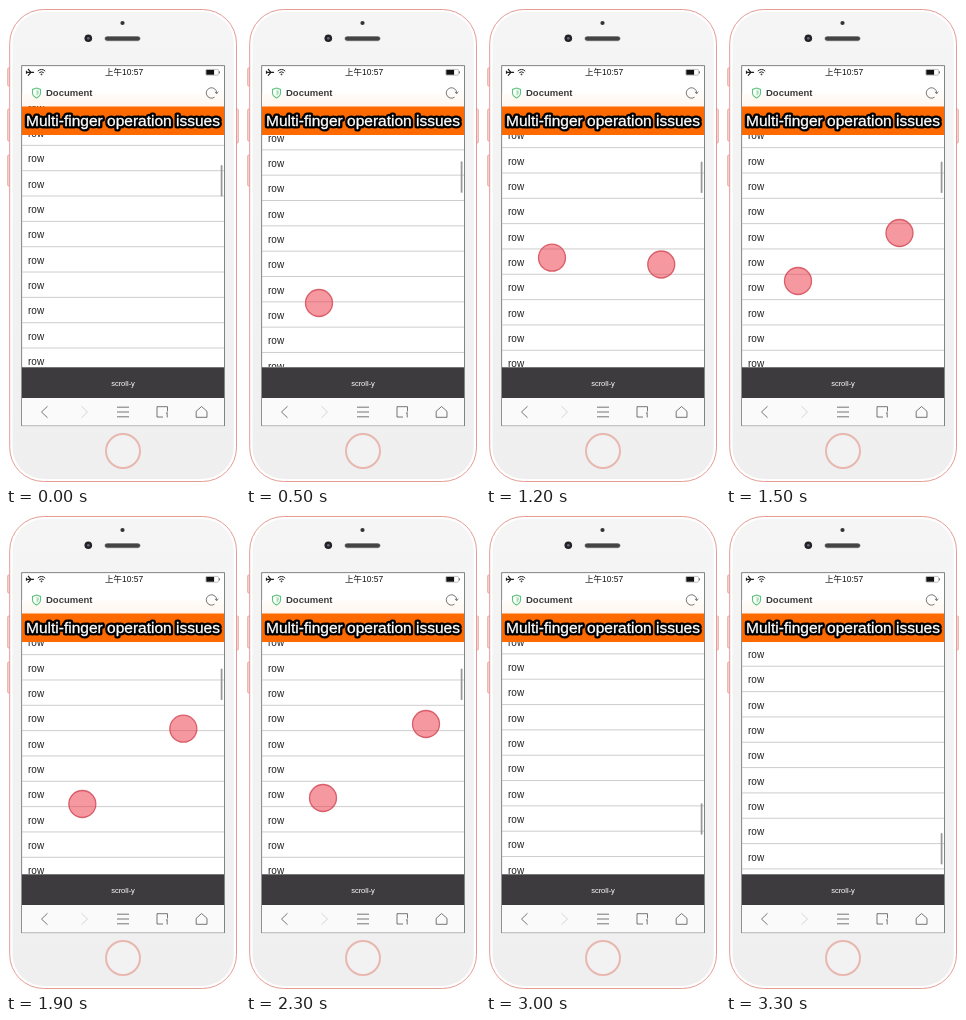
Recreate the animation shown at these times as an HTML page. Size 234 px wide and 479 px high, loop 3.4 s.

```html
<!DOCTYPE html>
<html lang="en">
<head>
<meta charset="utf-8">
<title>Multi-finger operation issues</title>
<style>
  html, body { margin: 0; width: 100%; height: 100%; overflow: hidden; background: #fff; }
  svg { display: block; width: 234px; height: 479px; }
  text { font-family: "Liberation Sans", Arial, sans-serif; }
  .cjk { font-family: "Liberation Sans", "Noto Sans CJK SC", "Noto Sans CJK", sans-serif; }
  .line { fill: none; stroke: #555; stroke-width: .8; }
  .title { font-size: 15.5px; text-anchor: middle; stroke-linejoin: round; }
</style>
</head>
<body>
<svg viewBox="0 0 234 479">
  <defs>
    <clipPath id="page"><rect x="16" y="100" width="202" height="261"/></clipPath>
    <linearGradient id="glow" x1="0" y1="0" x2="0" y2="1">
      <stop offset="0" stop-color="#fffcfa"/><stop offset="1" stop-color="#fff5ee"/>
    </linearGradient>
    <linearGradient id="shell" x1="0" y1="0" x2="0" y2="1">
      <stop offset="0" stop-color="#f5f5f5"/><stop offset="1" stop-color="#efefef"/>
    </linearGradient>
  </defs>

  <!-- phone body -->
  <g fill="#f8dcd8" stroke="#dc8f87" stroke-width=".7">
    <rect x="1.700" y="62" width="2.300" height="18" rx="1"/>
    <rect x="1.700" y="103" width="2.300" height="32" rx="1"/>
    <rect x="1.700" y="149" width="2.300" height="31" rx="1"/>
    <rect x="230" y="103" width="2.300" height="34" rx="1"/>
  </g>
  <rect x="3.700" y="3.500" width="226.800" height="472" rx="34" fill="#fff" stroke="#e59c94" stroke-width="1"/>
  <rect x="6.500" y="6" width="221.200" height="467" rx="31.500" fill="url(#shell)"/>
  <circle cx="116.500" cy="17" r="2.100" fill="#333"/>
  <circle cx="82.300" cy="32.300" r="3.800" fill="#222"/>
  <circle cx="82.300" cy="32.300" r="1.400" fill="#667"/>
  <rect x="98.500" y="30" width="36" height="5.200" rx="2.600" fill="#444" stroke="#fff" stroke-width=".7"/>
  <circle cx="117" cy="445" r="17" fill="#f2f2f2" stroke="#e8b8b0" stroke-width="2"/>

  <!-- screen -->
  <rect x="15.700" y="59.700" width="202.800" height="360" fill="#fff" stroke="#666" stroke-width=".8"/>
  <rect x="16" y="87" width="202" height="14" fill="url(#glow)"/>

  <!-- status bar -->
  <path d="M20 66.300h8M25 66.300l-3-3.300M25 66.300l-3 3.300M20.500 64.800v3" stroke="#222" stroke-width="1.200" fill="none"/>
  <g fill="none" stroke="#222" stroke-width="1">
    <path d="M31.800 65.100q3.700-3.300 7.400 0M33.200 66.800q2.300-2 4.600 0"/>
    <circle cx="35.500" cy="68.400" r=".5"/>
  </g>
  <text class="cjk" x="118.200" y="69.200" font-size="8.500" text-anchor="middle" fill="#111">上午10:57</text>
  <rect x="199.800" y="63.400" width="12.600" height="5.800" rx="1" fill="none" stroke="#999" stroke-width=".6"/>
  <rect x="200.300" y="63.900" width="7.800" height="4.800" fill="#111"/>
  <rect x="213" y="65.300" width="1" height="2" fill="#777"/>

  <!-- title bar -->
  <path d="M30.500 82l4 1.500v3.200q0 3.300-4 5.300q-4-2-4-5.300v-3.200z" fill="#fff" stroke="#5cc47a" stroke-width="1.100"/>
  <path d="M30.500 84v6q2.300-1.300 2.300-3.400V84.800z" fill="#a5dfb6"/>
  <text x="40" y="90.200" font-size="9.500" font-weight="bold" fill="#3c3c3c">Document</text>
  <path class="line" d="M208.500 91.200A5.200 5.200 0 1 1 210.700 87M208.800 86l2 1.700l1.500-2"/>

  <!-- page -->
  <g clip-path="url(#page)">
    <g id="rows"></g>
    <rect id="bar" x="214.700" width="1.800" height="31.500" rx=".9" fill="#9a9a9a"/>
  </g>
  <rect x="16" y="100.500" width="202" height="28.500" fill="#ff6a00"/>
  <text class="title" x="117" y="120" stroke="#000" stroke-width="5">Multi-finger operation issues</text>
  <text class="title" x="117" y="120" fill="#fff" stroke="#fff" stroke-width=".3" aria-hidden="true">Multi-finger operation issues</text>

  <!-- footer -->
  <rect x="16" y="361.300" width="202" height="30.700" fill="#3d3b3d"/>
  <text x="117" y="379.700" font-size="7.500" text-anchor="middle" fill="#fff">scroll-y</text>
  <rect x="16" y="392" width="202" height="27.500" fill="#fbfafb"/>
  <g class="line">
    <path d="M41.500 400.300l-6 5.700l6 5.700"/>
    <path d="M75.500 400.300l6 5.700l-6 5.700" stroke="#ccc"/>
    <path d="M111 401.200h12M111 406h12M111 410.800h12"/>
    <path d="M157 411h-6v-10.300h10.500v4.800M160 407.300l1.200-.8v5"/>
    <path d="M190.200 405.300l5.400-4.800l5.400 4.800v6h-10.800z"/>
  </g>

  <g id="fingers" fill="#ee3a48" fill-opacity=".52" stroke="#d04450" stroke-opacity=".8" stroke-width="1.300"></g>
</svg>
<script>
const LOOP = 3400, STEP = 100, PITCH = 25.33, BASELINE = 156.4;
const RELEASE = 2400, FADE_START = 2500, FADE_TIME = 400;

// Each point: time, then values.
const drag = [[100, 0], [500, -29.8], [600, -27.6]];
const fingers = [
  { path: [[200, 72, 276], [500, 73, 297], [600, 72, 295], [900, 62, 245], [1050, 63, 240],
           [1500, 72, 275], [1700, 76, 294], [2300, 77, 285], [2500, 77.5, 285]] },
  { path: [[700, 176, 298], [900, 177, 290], [1500, 173.5, 227], [1700, 176, 218],
           [2300, 180, 211], [2500, 183, 211]] }
];

function make(tag, parent, attrs = {}) {
  const node = document.createElementNS("http://www.w3.org/2000/svg", tag);
  set(node, attrs);
  return parent.appendChild(node);
}

function set(node, attrs) {
  for (const key in attrs) node.setAttribute(key, attrs[key]);
}

function sample(points, t) {
  const next = points.findIndex(p => p[0] > t);
  if (next < 0) return points[points.length - 1].slice(1);
  if (next === 0) return points[0].slice(1);
  const a = points[next - 1], b = points[next];
  const k = (t - a[0]) / (b[0] - a[0]);
  return a.slice(1).map((v, i) => v + (b[i + 1] - v) * k);
}

function scrollAt(t) {
  const fling = 1682.6 * (1 - Math.exp(-Math.max(0, t - RELEASE) / 575));
  return sample(drag, t)[0] + fling;
}

const rows = document.getElementById("rows");
const bar = document.getElementById("bar");
const fingerLayer = document.getElementById("fingers");
const firstRow = BASELINE - 2 * PITCH;
for (let i = 0; i < 12; i++) {
  const y = firstRow + i * PITCH;
  make("text", rows, { x: 22, y, "font-size": 10, fill: "#222" }).textContent = "row";
  make("path", rows, { d: `M16 ${y + 8.3}h202`, stroke: "#c8c8c8", "stroke-width": .9 });
}
for (const finger of fingers) finger.node = make("circle", fingerLayer);

function render(t) {
  const scroll = scrollAt(t);
  // Rows repeat, so only the offset within one pitch matters.
  const shift = ((-scroll % PITCH) + PITCH) % PITCH;
  set(rows, { transform: `translate(0 ${shift})` });
  set(bar, { y: 159 + scroll * .1235 });

  const fade = Math.min(1, Math.max(0, (t - FADE_START) / FADE_TIME));
  for (const { node, path } of fingers) {
    const [cx, cy] = sample(path, t);
    const shown = t >= path[0][0] && fade < 1;
    set(node, { cx, cy, r: 13.5 + 11 * fade, opacity: shown ? (1 - fade) ** 1.8 : 0 });
  }
}

const start = performance.now();
function frame() {
  const t = (performance.now() - start) % LOOP;
  render(Math.floor(t / STEP) * STEP);
  requestAnimationFrame(frame);
}
frame();
</script>
</body>
</html>
```
